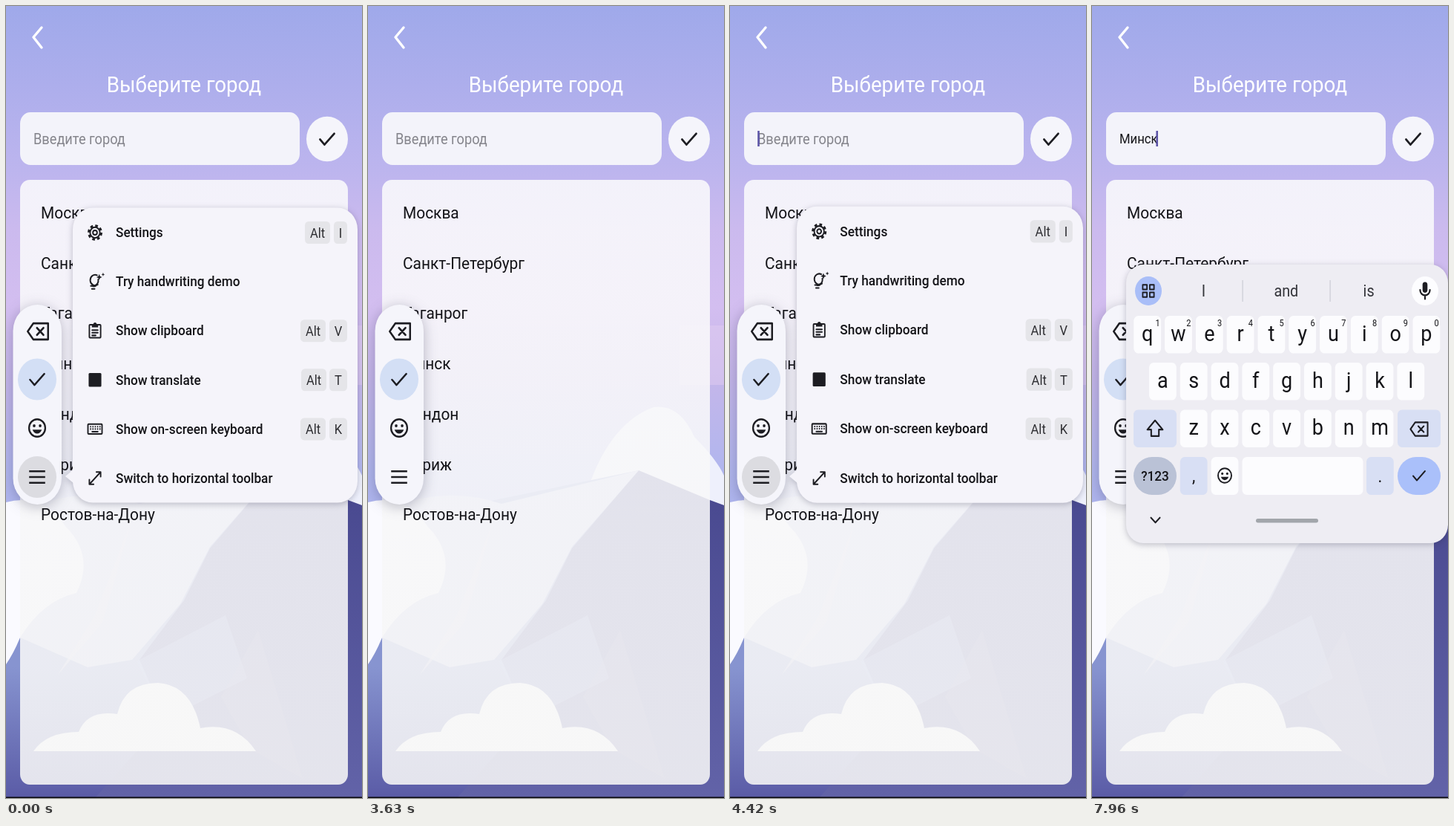
An HTML page that plays this animation: 480 px wide and 1066 px high, repeating every 8000 ms.

```html
<!DOCTYPE html>
<html lang="ru">
<head>
<meta charset="utf-8">
<title>Выберите город</title>
<style>
  html, body { margin: 0; width: 100%; height: 100%; overflow: hidden; background: #000; }
  svg { display: block; width: 100vw; height: 100vh; }
  text { font-family: Roboto, "Noto Sans", sans-serif; fill: #141418; }
  .line { fill: none; stroke: #1d1d22; stroke-width: 2; stroke-linecap: round; stroke-linejoin: round; }
  .solid { fill: #1d1d22; stroke: none; }
  .soft { filter: drop-shadow(0 2px 4px rgba(40, 40, 70, .28)); }
  .wide { filter: drop-shadow(0 3px 9px rgba(40, 40, 70, .3)); }
</style>
</head>
<body>
<svg id="stage" viewBox="0 0 480 1066" preserveAspectRatio="none"></svg>
<script>
const LOOP = 8000;
const ASPECT = 1.08; // screen pixels are slightly taller than wide

const text = (x, y, size, str, { fill = '#141418', anchor = 'start', weight = 400, attrs = '' } = {}) =>
  `<text transform="translate(${x} ${y}) scale(1 ${ASPECT})" font-size="${size}" font-weight="${weight}"
    text-anchor="${anchor}" style="fill:${fill}" ${attrs}>${str}</text>`;
const box = (x, y, w, h, r, fill, ry = r * ASPECT) =>
  `<rect x="${x}" y="${y}" width="${w}" height="${h}" rx="${r}" ry="${ry}" fill="${fill}"/>`;
const disc = (x, y, r, fill, attrs = '') =>
  `<ellipse cx="${x}" cy="${y}" rx="${r}" ry="${r * ASPECT}" fill="${fill}" ${attrs}/>`;
const shape = (d, fill, opacity = 1) => `<path d="${d}" fill="${fill}" opacity="${opacity}"/>`;
const centered = { anchor: 'middle' };

// Icons live on a 24 unit grid centred on 0,0.
const ICONS = {
  check: '<path d="M-8 0L-3 5.5L8-6"/>',
  erase: '<path d="M-5-8H11V8H-5L-11 0ZM-1-3.5L6 3.5M6-3.5L-1 3.5"/>',
  smile: '<circle r="9.5"/><circle class="solid" cx="-3.5" cy="-2.5" r="1.6"/><circle class="solid" cx="3.5" cy="-2.5" r="1.6"/><path class="solid" d="M-5.5 1.8H5.5Q3.5 6 0 6Q-3.5 6-5.5 1.8Z"/>',
  menu: '<path d="M-9-6H9M-9 0H9M-9 6H9" stroke-linecap="butt"/>',
  gear: '<circle r="7"/><circle r="9" stroke-width="3" stroke-dasharray="3.8 3.27" stroke-linecap="butt"/><circle r="3"/>',
  bulb: '<path d="M3-8.5A7 7 0 1 0 4 3.8M-3 6H0M-6 5.5H1M-4.5 9.5H-.5"/><path d="M4.5-3A7 7 0 0 1 1 4.5"/><path class="solid" d="M6-10L7.2-7.2L10-6L7.2-4.8L6-2L4.8-4.8L2-6L4.8-7.2ZM11.5-12L12.2-10.2L14-9.5L12.2-8.8L11.5-7L10.8-8.8L9-9.5L10.8-10.2Z"/>',
  clip: '<rect x="-8" y="-8" width="16" height="17" rx="1"/><path class="solid" d="M-4.5-9H-2.5A2.6 2.6 0 0 1 2.5-9H4.5V-4.5H-4.5Z"/><path d="M-4-1H4M-4 2.5H4M-4 6H1"/>',
  plain: '<rect class="solid" x="-9" y="-9" width="18" height="18" rx="1.5"/>',
  keys: '<rect x="-10" y="-6.5" width="20" height="13" rx="1"/><path d="M-7-3H8M-7 0H8" stroke-dasharray="1.6 1.7" stroke-linecap="butt"/><path d="M-4 3.6H4"/>',
  arrows: '<path d="M-8 8L8-8M2-8H8V-2M-8 2V8H-2"/>',
  shift: '<path d="M0-9L9 1H4.5V8H-4.5V1H-9Z"/>',
  grid: '<path d="M-8-8H-2V-2H-8ZM2-8H8V-2H2ZM-8 2H-2V8H-8ZM2 2H8V8H2Z"/>',
  mic: '<rect class="solid" x="-3" y="-10" width="6" height="12" rx="3"/><path d="M-6-1A6 6 0 0 0 6-1M0 5V9"/>',
  down: '<path d="M-6-3L0 3L6-3"/>',
};
const icon = (name, x, y, scale = 1, width = 2) =>
  `<g class="line" style="stroke-width:${width}" transform="translate(${x} ${y}) scale(${scale} ${scale * ASPECT})">${ICONS[name]}</g>`;

function scene() {
  const stops = [[0, '#9fa9ea'], [.1, '#adaeec'], [.21, '#bdb5ee'], [.28, '#cbbaee'],
    [.38, '#d3bef0'], [.47, '#c4b6ea'], [.59, '#b0b6ee'], [1, '#8f9ade']];
  return `<defs>
    <linearGradient id="sky" x2="0" y2="1">${stops.map(([o, c]) => `<stop offset="${o}" stop-color="${c}"/>`).join('')}</linearGradient>
    <linearGradient id="rock" x2="0" y2="1"><stop stop-color="#47478e"/><stop offset="1" stop-color="#6263a8"/></linearGradient>
    <linearGradient id="slope" x2="0" y2="1"><stop offset=".6" stop-color="#8794d0"/><stop offset="1" stop-color="#5a5ba6"/></linearGradient>
    <linearGradient id="sheet" x2="0" y2="1"><stop stop-color="#fafafc"/><stop offset="1" stop-color="#f6f6f6"/></linearGradient>
  </defs>`
    + box(0, 0, 480, 1066, 0, 'url(#sky)')
    + shape('M420 430H480V510H420Z', '#e2cdf2', .5)
    + shape('M300 640Q330 560 385 540Q420 535 440 580Q470 610 480 632V690H300Z', '#eef0fc')
    + shape('M365 625L461 665L480 672V1066H0V760Z', 'url(#rock)')
    + shape('M365 625L275 730L240 800L180 880L215 960L120 1066H0V700Z', 'url(#slope)')
    + shape('M365 625L275 728L235 805L170 880L110 890L19 850L0 886V690Q90 640 180 670Z', '#c9cdec')
    + shape('M0 668Q50 655 80 700Q120 740 95 790Q50 800 19 850Q10 872 0 886Z', '#fafaff')
    + shape('M170 690L120 820L70 900L130 830Z', '#dcd4e8', .6)
    + shape('M176 882L296 820L325 905L215 960Z', '#8f9fe0', .45)
    + shape('M290 930L340 840L400 1040L330 1000Z', '#8a7fae', .3)
    + shape('M37 1003Q55 977 98 977Q110 947 150 953Q160 911 205 911Q250 914 262 972Q310 963 337 1003Z', '#ffffff')
    + box(0, 1064.5, 480, 2, 0, '#08080c');
}

function page() {
  const cities = ['Москва', 'Санкт-Петербург', 'Таганрог', 'Минск', 'Лондон', 'Париж', 'Ростов-на-Дону'];
  return `<path d="M48 29L37 42L48 56" fill="none" stroke="#fff" stroke-width="3.4" stroke-linecap="round" stroke-linejoin="round"/>`
    + text(240, 115.5, 27.7, 'Выберите город', { fill: '#fff', ...centered })
    + box(19, 143, 377, 71, 14, '#f3f3fa')
    + disc(433, 179, 28, '#f5f5fb')
    + icon('check', 433, 179.5, 1.2, 2.2)
    + text(37, 185.5, 18.2, 'Введите город', { fill: '#85858c', attrs: 'id="hint"' })
    + text(37, 185, 16.7, 'Минск', { attrs: 'id="value"' })
    + `<rect id="caret" y="168" width="2.6" height="21" fill="#5d55a8"/>`
    + `<rect x="19" y="234" width="442" height="814" rx="13" ry="14" fill="url(#sheet)" opacity=".88"/>`
    + cities.map((city, i) => text(47, 286 + i * 67.7, 20.9, city)).join('');
}

function toolbar() {
  return `<g class="wide">${box(9.5, 402, 65.5, 269, 32.7, '#f5f5fb')}</g>`
    + disc(42, 502.5, 26, '#d3dff5')
    + disc(42, 634, 26, '#dcdce1', 'id="pressed"')
    + icon('erase', 43, 438, 1.25) + icon('check', 42, 503, 1.2)
    + icon('smile', 42, 568, 1.15) + icon('menu', 42, 634, 1.2, 1.9);
}

function menu() {
  const rows = [['gear', 'Settings', 'I', 403, 442], ['bulb', 'Try handwriting demo'],
    ['clip', 'Show clipboard', 'V', 397, 436], ['plain', 'Show translate', 'T', 398, 436],
    ['keys', 'Show on-screen keyboard', 'K', 397, 436], ['arrows', 'Switch to horizontal toolbar']];
  const badge = (x, w, y, label) => box(x, y - 15, w, 30, 5, '#e5e5e9')
    + text(x + w / 2, y + 7, 16.5, label, { fill: '#2c2c30', ...centered });
  return `<g class="soft">${box(90, 271.5, 384, 397, 27, '#f5f4fa')}${shape('M80 633L92 623V643Z', '#f5f4fa')}</g>`
    + rows.map(([name, label, key, altX, keyX], i) => {
      const y = 305 + i * 66.1;
      return icon(name, 120, y, .95) + text(148, y + 6.2, 17.2, label, { weight: 500 })
        + (key ? badge(altX, 34, y, 'Alt') + badge(keyX, 460 - keyX, y, key) : '');
    }).join('');
}

function keyboard() {
  const PITCH = 41.8, WHITE = '#fcfcfe', TINT = '#d8dff4';
  const row = (keys, x0, y) => [...keys].map((key, i) => {
    const x = x0 + i * PITCH;
    return box(x, y, 36.8, 50.5, 6, WHITE) + text(x + 18.4, y + 33.5, 27, key, centered);
  }).join('');
  const digits = [...'1234567890'].map((d, i) => text(88.5 + i * PITCH, 431, 11, d, centered)).join('');
  return `<g class="soft">${box(46, 348, 434, 375, 23, '#eeedf3')}</g>`
    + disc(76, 383.5, 18, '#a9bef8') + icon('grid', 76, 383.5, .95, 1.9)
    + disc(449, 383.5, 18, '#fdfdff') + icon('mic', 449, 383.5, 1.1)
    + row('qwertyuiop', 56.3, 417) + digits
    + row('asdfghjkl', 77, 480) + row('zxcvbnm', 118.8, 543.5)
    + box(56, 543.5, 58, 50.5, 6, TINT) + icon('shift', 85, 569, 1.15, 1.8)
    + box(412, 543.5, 58, 50.5, 6, TINT) + icon('erase', 441, 569.5, 1.05, 1.9)
    + box(56, 607, 58, 51, 25, '#bac2d6', 25.5) + text(85, 638.5, 17.2, '?123', { weight: 500, ...centered })
    + box(118.8, 607, 36.8, 51, 6, TINT) + text(137.2, 641, 22, ',', centered)
    + box(160.6, 607, 36.8, 51, 6, WHITE) + icon('smile', 179, 632, .95)
    + box(202.5, 607, 163, 51, 6, WHITE)
    + box(370, 607, 36.8, 51, 6, TINT) + text(388.4, 641, 22, '.', centered)
    + box(412, 607, 58, 51, 25, '#aac0fa', 25.5) + icon('check', 441, 632.5, 1, 1.9)
    + icon('down', 85.5, 692, 1) + box(221, 690, 84, 5.5, 2.8, '#a2a6ab', 2.8)
    + `<g id="chip">${box(217, 365, 91, 37, 8, '#f6f6fb')}${icon('clip', 233, 384, .95)}${text(248, 389.5, 15.4, 'Минск', { weight: 500 })}</g>`
    + `<g id="words">${['I', 'and', 'is'].map((w, i) => text(150.5 + i * 111.3, 391, 19.8, w, { fill: '#34353a', ...centered })).join('')}
       ${box(202.5, 369, 1.2, 29, 0, '#cbccd4')}${box(320.5, 369, 1.2, 29, 0, '#cbccd4')}</g>`;
}

const stage = document.getElementById('stage');
stage.innerHTML = scene() + page() + toolbar()
  + `<g id="menu">${menu()}</g><g id="keyboard">${keyboard()}</g>`;
const part = Object.fromEntries([...stage.querySelectorAll('[id]')].map(el => [el.id, el]));

const clamp = v => Math.max(0, Math.min(1, v));
const within = (t, from, to) => t >= from && t < to;
const show = (el, opacity) => {
  el.style.display = opacity > 0 ? '' : 'none';
  el.style.opacity = opacity;
};

const CARET_TOGGLES = [500, 920, 1420, 1830, 2290, 2710, 3210, 3630, 4130, 4540,
  5000, 5500, 5920, 6420, 6830, 7500, 7960];

function spring(t) {
  const damping = .85, rate = 16, root = Math.sqrt(1 - damping ** 2);
  const phase = rate * root * t;
  return 1 - Math.exp(-damping * rate * t) * (Math.cos(phase) + damping / root * Math.sin(phase));
}

function draw(now) {
  const t = now % LOOP;
  const typed = t >= 7000;

  show(part.caret, CARET_TOGGLES.filter(at => at <= t).length % 2);
  part.caret.setAttribute('x', typed ? 86.4 : 37.2);
  show(part.hint, +!typed);
  show(part.value, +typed);

  const scale = within(t, 4000, 4540) ? spring((t - 4000) / 1000) : 1;
  part.menu.setAttribute('transform', `translate(80 632) scale(${scale}) translate(-80 -632)`);
  let menuAlpha = 0;
  if (t < 2000) menuAlpha = 1 - clamp((t - 1210) / 130);
  else if (t >= 4000) menuAlpha = clamp((t - 4000) / 80) * (1 - clamp((t - 6000) / 130));
  show(part.menu, menuAlpha);
  show(part.pressed, +(t < 1170 || within(t, 4000, 5960)));

  let keysAlpha = +(t >= 5960);
  if (within(t, 1170, 2880)) keysAlpha = 1 - clamp((t - 2830) / 50);
  show(part.keyboard, keysAlpha);
  show(part.chip, +(within(t, 1250, 2880) || within(t, 6040, 7000)));
  show(part.words, +(t >= 7040));
}

function tick() {
  draw(performance.now());
  requestAnimationFrame(tick);
}
tick();
</script>
</body>
</html>
```
